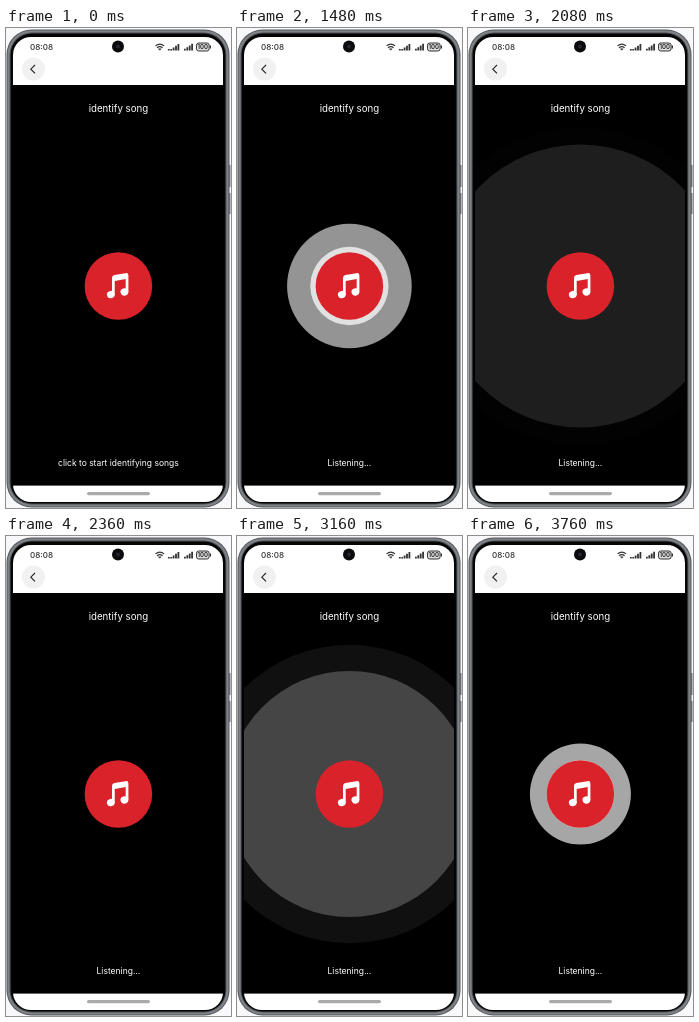
An HTML page for the animation above (3.84 s loop, 225 by 480 pixels).

```html
<!DOCTYPE html>
<html lang="en">
<head>
<meta charset="utf-8">
<title>Identify song</title>
<style>
  html, body { margin: 0; width: 100%; height: 100%; overflow: hidden; background: #f8f8fb; }
  svg { display: block; width: 100vw; height: 100vh; }
  text { font-family: Inter, "Noto Sans", sans-serif; }
  .label { fill: #fff; text-anchor: middle; }
</style>
</head>
<body>
<svg viewBox="0 0 225 480">
  <defs>
    <clipPath id="view"><rect x="7" y="57" width="210" height="400.6"/></clipPath>
  </defs>

  <!-- phone body -->
  <path d="M223.5 137v22M223.5 165v21" stroke="#77797d" stroke-width="2"/>
  <rect x=".5" y="1.5" width="223" height="478" rx="25" fill="#55585c"/>
  <rect x="1.5" y="2.5" width="221" height="476" rx="24" fill="#7f8286"/>
  <rect x="3.6" y="4.6" width="216.8" height="471.8" rx="22" fill="#4b4e52"/>
  <rect x="4.6" y="5.6" width="214.8" height="469.8" rx="21" fill="#050505"/>
  <rect x="7" y="9" width="210" height="465" rx="18" fill="#fff"/>

  <!-- status bar -->
  <text x="24" y="22.2" font-size="8.1" font-weight="500" fill="#333">08:08</text>
  <circle cx="112" cy="18.5" r="6" fill="#0b0b0d"/>
  <circle cx="112" cy="18.5" r="2" fill="#25262f"/>
  <g fill="none" stroke="#333" stroke-width="1.2">
    <path d="M149.5 17.9q4.3-3.6 8.6 0M151 19.7q2.8-2.3 5.6 0"/>
    <path d="M152.4 20.8h2.8l-1.4 1.5z" fill="#333" stroke-width=".5"/>
    <rect x="190.5" y="15" width="12.6" height="8" rx="2.2" fill="#ddd" stroke-width="1"/>
    <path d="M204.4 17.5v3"/>
  </g>
  <path id="bars" stroke="#333" stroke-width="1.8"/>
  <text x="196.8" y="21.3" font-size="6" font-weight="600" fill="#222" text-anchor="middle">100</text>

  <!-- back button -->
  <circle cx="27.5" cy="41" r="11.5" fill="#f1f1f1"/>
  <path d="M29 37l-4.2 4.2 4.2 4.2" fill="none" stroke="#222" stroke-width="1.1"/>

  <!-- page -->
  <rect x="6" y="57" width="212" height="400.6"/>
  <g clip-path="url(#view)" fill="#fff">
    <circle class="ring" cx="112.4" cy="258"/>
    <circle class="ring" cx="112.4" cy="258"/>
  </g>
  <circle cx="112.4" cy="258" r="33.8" fill="#da222b"/>
  <g fill="#fff">
    <ellipse cx="104.8" cy="266.6" rx="3.9" ry="3.6" transform="rotate(-20 104.8 266.6)"/>
    <ellipse cx="118.4" cy="264" rx="3.9" ry="3.6" transform="rotate(-20 118.4 264)"/>
    <path d="M106 267V250q0-2.5 2.4-2.9l11-1.9q3-.5 3 2.3V264h-2.7V251l-11 1.9V267z"/>
  </g>
  <text class="label" x="112.4" y="83.5" font-size="9.7">identify song</text>
  <text class="label" id="hint" x="112.4" y="438" font-size="8.5"></text>

  <rect x="81" y="464" width="63" height="3.2" rx="1.6" fill="#aaa9ac"/>
</svg>
<script>
const LOOP = 3840, TAP = 920, SPAN = 970;
const R0 = 33.8, R1 = 160;
const starts = [[1175, 2374, 3531], [1353, 2544, 3745]];
const rings = document.querySelectorAll(".ring");
const hint = document.getElementById("hint");

const signal = (x, heights) => heights.map((h, i) => `M${x + i * 2.4} 22.5v${-h}`).join("");
document.getElementById("bars").setAttribute("d",
  signal(162.8, [1.5, 1.5, 3, 4.7, 6.5]) + signal(178.9, [1.8, 3.3, 5, 6.8]));

const ease = p => (1 - Math.cos(Math.PI * p)) / 2;

function drawRing(ring, times, t) {
  const start = times.find(s => t >= s && t < s + SPAN);
  const s = start === undefined ? 1 : ease((t - start) / SPAN);
  ring.setAttribute("r", R0 + (R1 - R0) * s);
  ring.setAttribute("opacity", 0.75 * (1 - s));
}

function draw(now) {
  const t = now % LOOP;
  const text = t < TAP ? "click to start identifying songs" : "Listening...";
  if (hint.textContent !== text) hint.textContent = text;
  rings.forEach((ring, i) => drawRing(ring, starts[i], t));
}

const origin = performance.now();
function tick() {
  draw(performance.now() - origin);
  requestAnimationFrame(tick);
}
tick();
</script>
</body>
</html>
```
